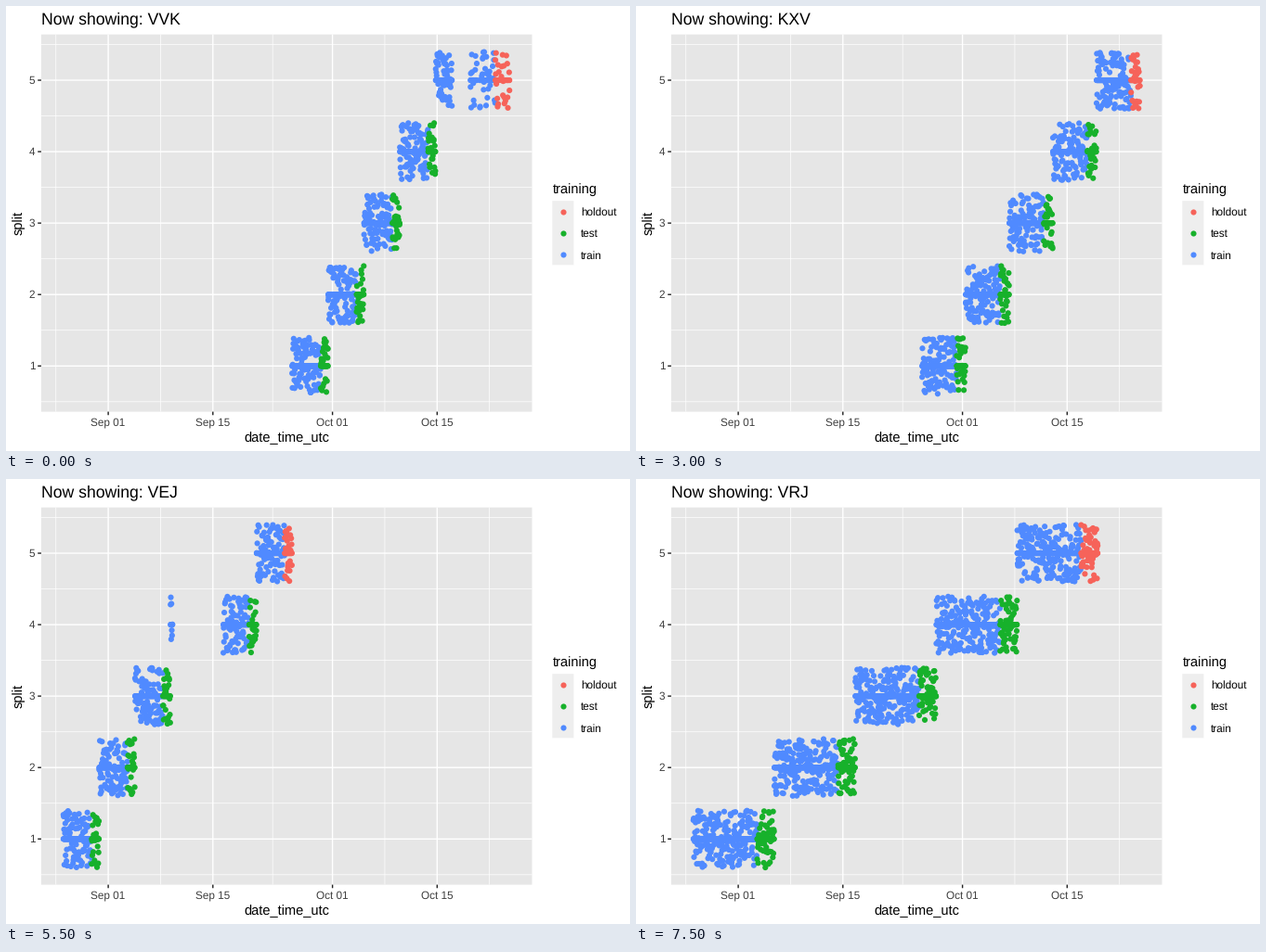
These frames come from a looping animation (672 by 480 pixels, 8000 ms). A matplotlib script:

```python
import numpy as np
import matplotlib.pyplot as plt
from matplotlib.animation import FuncAnimation
from matplotlib.patches import Rectangle

W, H, DPI = 672, 480, 96
LEFT, RIGHT, TOP, BOTTOM = 37.9, 566.5, 30.7, 437.6
TRAIN, TEST, HOLDOUT = "#508AFF", "#17B12B", "#F6635A"
AXIS_TEXT, TICK = "#3F3F3F", "#242424"
DOT = 21.3

plt.rcParams.update({
    "font.family": "Liberation Sans",
    "text.hinting": "none",
})


def x_of(day):
    """Pixel column of a day counted from Sep 01."""
    return 110.1 + 8.05 * day


def y_of(value):
    return BOTTOM - (value - 0.36) * 77.06


def make_scene(seed, *spans):
    """Hourly data over spans of days (from, to, share kept), cut into
    five equal splits whose last fifth is the test or holdout part."""
    rng = np.random.default_rng(seed)
    runs = []
    for lo, hi, *share in spans:
        hours = np.arange(lo, hi, 1 / 24)
        runs.append(hours[rng.random(hours.size) < (share or [1])[0]])

    xy, colors = [], []
    for split, days in enumerate(np.array_split(np.concatenate(runs), 5), 1):
        n_train = round(0.79 * days.size)
        last = HOLDOUT if split == 5 else TEST
        split_colors = [TRAIN] * n_train + [last] * (days.size - n_train)
        jitter = rng.uniform(-0.4, 0.4, days.size)
        for offset in (0 * jitter, jitter):
            xy.append(np.column_stack([x_of(days), y_of(split + offset)]))
            colors += split_colors
    xy, colors = np.concatenate(xy), np.array(colors)
    order = np.argsort(colors != TRAIN, kind="stable")
    return xy[order], colors[order]


# Data limits shared by most series: record start and end, and an outage
START, END = -6, 53.75
OUT, BACK = 8.45, 24.6

SCENES = [
    make_scene(1, (BACK, 46), (48.3, END, 0.5)),
    make_scene(2, (START, OUT), (BACK, END)),
    make_scene(3, (START, OUT), (BACK, 26.25), (28.4, 29.1), (30.4, 34.5),
               (39.9, END)),
    make_scene(4, (BACK, END)),
    make_scene(5, (-3.5, 13.6), (13.6, 15.2, 0.25), (15.2, BACK)),
    make_scene(6, (OUT, BACK), (36.5, 43.6), (52.9, 52.94)),
    make_scene(7, (START, 8.6), (15.4, BACK)),
    make_scene(8, (START, -3.6, 0.6), (-2.8, -2.76), (-1.6, -1.3),
               (-0.4, OUT), (BACK, 25.1), (27.6, 27.64), (30.3, 30.6),
               (35.5, 36.5)),
    make_scene(9, (START, 48.1)),
]
NAMES = ["VVK", "KQVY", "KQZ", "KXV", "VRXQ", "VEJ", "VWW", "VRJ"]

fig = plt.figure(figsize=(W / DPI, H / DPI), dpi=DPI, facecolor="white")
ax = fig.add_axes([0, 0, 1, 1])
ax.set_xlim(0, W)
ax.set_ylim(H, 0)
ax.axis("off")


def box(x0, y0, x1, y1, color):
    ax.add_patch(Rectangle((x0, y0), x1 - x0, y1 - y0, fc=color, ec="none",
                           zorder=0, snap=False))


def line(x0, y0, x1, y1, color="white", width=1.07):
    ax.plot([x0, x1], [y0, y1], color=color, lw=width, zorder=1,
            solid_capstyle="butt", snap=False)


def label(x, y, text, size=8.8, color="black", ha="left", va="baseline", **kw):
    return ax.text(x, y, text, size=size, color=color, ha=ha, va=va, **kw)


# Panel, grid and axes
box(LEFT, TOP, RIGHT, BOTTOM, "#E6E6E6")
for day in (-7, 7, 22, 37, 51):
    line(x_of(day), TOP, x_of(day), BOTTOM, width=0.53)
for k in range(6):
    line(LEFT, y_of(k + 0.5), RIGHT, y_of(k + 0.5), width=0.53)
for text, day in {"Sep 01": 0, "Sep 15": 14, "Oct 01": 30, "Oct 15": 44}.items():
    x = x_of(day)
    line(x, TOP, x, BOTTOM)
    line(x, BOTTOM, x, BOTTOM + 3.67, TICK)
    label(x, 453, text, color=AXIS_TEXT, ha="center")
for k in range(1, 6):
    y = y_of(k)
    line(LEFT, y, RIGHT, y)
    line(LEFT - 3.67, y, LEFT, y, TICK)
    label(31.3, y + 4.2, str(k), color=AXIS_TEXT, ha="right")
label((LEFT + RIGHT) / 2, 470, "date_time_utc", 11, ha="center")
label(13.6, (TOP + BOTTOM) / 2, "split", 11, ha="center", va="center",
      rotation=90)

# Legend
label(588.3, 202, "training", 11)
box(588.3, 210.2, 611.4, 279.3, "#EEEEEE")
for k, (text, color) in enumerate([("holdout", HOLDOUT), ("test", TEST),
                                   ("train", TRAIN)]):
    y = 221.8 + 23.04 * k
    ax.scatter([599.9], [y], s=DOT, c=color, linewidths=0, zorder=2)
    label(618.7, y + 4.5, text)

title = label(37.9, 19, "", 13.2)
dots = ax.scatter([], [], s=DOT, linewidths=0, zorder=3)


def update(i):
    # The name switches half a step before its points appear.
    offsets, colors = SCENES[(i + 1) // 2]
    dots.set_offsets(offsets)
    dots.set_facecolor(colors)
    title.set_text("Now showing: " + NAMES[i // 2])
    return dots, title


anim = FuncAnimation(fig, update, frames=16, interval=500, repeat=True,
                     repeat_delay=0, blit=False)
plt.show()
```
